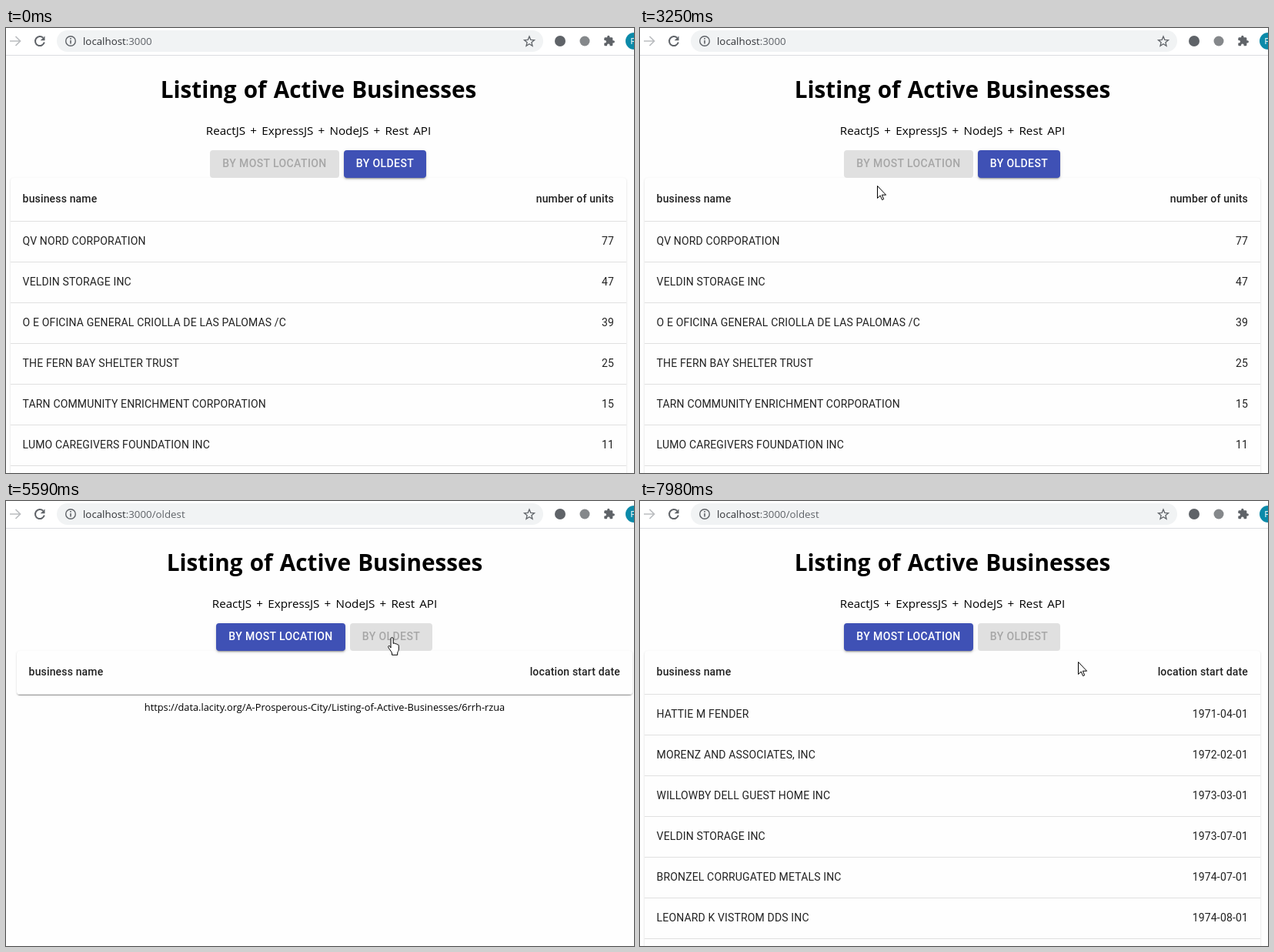
Recreate the animation shown at these times as an HTML page. Size 816x579 px, loop 8 s.

```html
<!DOCTYPE html>
<html lang="en">
<head>
<meta charset="utf-8">
<title>Listing of Active Businesses</title>
<style>
  html, body { margin: 0; width: 100%; height: 100%; overflow: hidden; background: #fefefe; }
  #stage { position: relative; width: 816px; height: 579px; overflow: hidden; color: #000;
    font-family: "Open Sans", "Noto Sans", sans-serif; white-space: nowrap; }
  #stage div, svg { position: absolute; }
  #bar { left: 0; top: 0; width: 816px; height: 35px; background: #fff; border-bottom: 1px solid #dadce0; }
  #url { left: 100px; top: 7px; font-size: 13.3px; line-height: 20px; color: #303236; }
  #url span { color: #5f6368; }
  #page { left: 0; top: 0; width: 816px; height: 579px; }
  .mid { left: 6px; width: 800px; text-align: center; }
  #title { top: 58px; font-size: 29.7px; font-weight: 700; line-height: 44px; word-spacing: 1.5px; }
  #stack { top: 121px; font-size: 15.2px; line-height: 24px; word-spacing: 2.3px; }
  #link { top: 258px; font-size: 12.8px; line-height: 20px; }
  .btn { top: 159px; height: 36px; border-radius: 4px; text-align: center;
    font: 500 14px/35px Roboto, sans-serif; letter-spacing: .02857em; }
  #most { left: 265px; width: 168px; }
  #old { left: 439px; width: 107px; }
  #clip { inset: 0; overflow: hidden; border-radius: 4px; }
  #ripple { left: -7px; top: -46px; width: 138px; height: 138px; border-radius: 50%; background: #fff; }
  #paper { left: 6px; top: 195px; width: 800px; border-radius: 4px; background: #fefefe;
    box-shadow: 0 2px 1px -1px #0003, 0 1px 1px #00000024, 0 1px 3px #0000001f; }
  .row { left: 0; width: 768.4px; height: 37px; padding: 15px 16px 0 15.6px; border-bottom: 1px solid #e0e0e0;
    display: flex; justify-content: space-between; color: rgba(0,0,0,.87);
    font: 400 14px/20px Roboto, sans-serif; letter-spacing: .01071em; }
  .head { top: 0; height: 41px; font-weight: 500; line-height: 24px; }
  #cursor { left: 0; top: 0; }
</style>
</head>
<body>
<div id="stage">
  <div id="page">
    <div id="title" class="mid">Listing of Active Businesses</div>
    <div id="stack" class="mid">ReactJS + ExpressJS + NodeJS + Rest API</div>
    <div id="paper">
      <div class="row head"><span>business name</span><span id="column"></span></div>
      <div id="units"></div>
      <div id="dates"></div>
    </div>
    <div id="link" class="mid">https://data.lacity.org/A-Prosperous-City/Listing-of-Active-Businesses/6rrh-rzua</div>
    <div id="most" class="btn">BY MOST LOCATION</div>
    <div id="old" class="btn">BY OLDEST<div id="clip"><div id="ripple"></div></div></div>
  </div>

  <div id="bar">
    <svg width="816" height="35" fill="none" stroke="#5f6368" stroke-width="1.7">
      <rect x="66" y="3" width="632" height="28" rx="14" fill="#f1f3f4" stroke="none"/>
      <path d="M5 17H18M12.5 11l6 6-6 6" stroke="#bbbdc0"/>
      <path d="M48.2 12.8A6 6 0 1 0 49.8 18.6" stroke-width="2"/>
      <path d="M50.5 10.5V16.3H44.7z" fill="#5f6368" stroke="none"/>
      <circle cx="84" cy="17" r="6.3" stroke-width="1.4"/>
      <path d="M84 16V20.5M84 13V14.7" stroke-width="1.6"/>
      <path d="M680 11l1.8 4.3 4.7.4-3.6 3 1.1 4.6-4-2.5-4 2.5 1.1-4.6-3.6-3 4.7-.4z" stroke-width="1.3"/>
      <g stroke="none" fill="#5f6368">
        <circle cx="720" cy="17" r="7"/>
        <circle cx="752" cy="17" r="6.5" fill="#85888b"/>
        <path transform="translate(776 9) scale(.65)" d="M20.5 11H19V7c0-1.1-.9-2-2-2h-4V3.5a2.5 2.5 0 0 0-5 0V5H4c-1.1 0-2 .9-2 2v3.8h1.5a2.7 2.7 0 0 1 0 5.4H2V20c0 1.1.9 2 2 2h3.8v-1.5a2.7 2.7 0 0 1 5.4 0V22H17c1.1 0 2-.9 2-2v-4h1.5a2.5 2.5 0 0 0 0-5z"/>
        <circle cx="816" cy="17" r="11" fill="#0b8aa9"/>
        <text x="811.5" y="21" font-family="Roboto, sans-serif" font-size="11" fill="#fff">P</text>
      </g>
    </svg>
    <div id="url">localhost<span>:3000<span id="path"></span></span></div>
  </div>

  <svg id="cursor" width="816" height="579" fill="#fff" stroke="#000" stroke-linejoin="round">
    <path id="arrow" d="M.5 .5V16.5L4.2 13 6.6 18.6 8.7 17.7 6.4 12.2H11.6z"/>
    <path id="hand" d="M4 14V2.2a1.6 1.6 0 0 1 3.2 0V8.5c1-.9 2.4-.6 2.6.5 1-.6 2.2-.2 2.4.8 1.2-.3 2.1.3 2.1 1.5V16c0 2-1.6 3-1.6 5v2.3H5.5V21C5 18.5.6 14.5.6 12.5c0-1.2 1.6-1.4 2.4-.3z"/>
  </svg>
</div>

<script>
const $ = id => document.getElementById(id);

const LOOP = 8000, HOVER = 4450, PRESS = 4990, ROUTE = 5200, SWITCH = 5350, LOADED = 7830;

const units = [
  ["QV NORD CORPORATION", 77],
  ["VELDIN STORAGE INC", 47],
  ["O E OFICINA GENERAL CRIOLLA DE LAS PALOMAS /C", 39],
  ["THE FERN BAY SHELTER TRUST", 25],
  ["TARN COMMUNITY ENRICHMENT CORPORATION", 15],
  ["LUMO CAREGIVERS FOUNDATION INC", 11]
];
const dates = [
  ["HATTIE M FENDER", "1971-04-01"],
  ["MORENZ AND ASSOCIATES, INC", "1972-02-01"],
  ["WILLOWBY DELL GUEST HOME INC", "1973-03-01"],
  ["VELDIN STORAGE INC", "1973-07-01"],
  ["BRONZEL CORRUGATED METALS INC", "1974-07-01"],
  ["LEONARD K VISTROM DDS INC", "1974-08-01"]
];
const fill = (id, rows) => $(id).innerHTML = rows.map(([name, value], i) =>
  `<div class="row" style="top:${57 + 53 * i}px"><span>${name}</span><span>${value}</span></div>`).join("");
fill("units", units);
fill("dates", dates);

// Pointer path: time, x, y
const path = [
  [1080, 804, 160], [1390, 720, 170], [1616, 647, 221], [1700, 690, 262], [1850, 800, 311],
  [1930, 806, 312], [2100, 800, 230], [2250, 760, 173], [2460, 680, 200], [2700, 603, 245],
  [2900, 500, 236], [3150, 304, 212], [3226, 308, 205], [3390, 330, 199], [3545, 381, 198],
  [3640, 412, 198], [4110, 412, 198], [4330, 450, 211], [4500, 480, 196], [4730, 501, 177],
  [6900, 501, 177], [6980, 494, 190], [7200, 500, 200], [7400, 517, 207], [7595, 535, 211],
  [7670, 543, 211], [7978, 569, 209]
];

const clamp = v => Math.min(1, Math.max(0, v));
const ease = v => (v = clamp(v), v * v * (3 - 2 * v));
const lerp = (a, b, k) => a + (b - a) * k;
const mix = (a, b, k) => a.map((v, i) => lerp(v, b[i], k));

// Button looks: colour, then offset, blur and spread of three shadows
const idle = { bg: [63, 81, 181], shade: [3, 1, -2, 2, 2, 0, 1, 5, 0] };
const hover = { bg: [48, 63, 159], shade: [2, 4, -1, 4, 5, 0, 1, 10, 0] };
const pressed = { bg: hover.bg, shade: [5, 5, -3, 8, 10, 1, 3, 14, 2] };
const off = { bg: [224, 224, 224], shade: [0, 0, 0, 0, 0, 0, 0, 0, 0] };

function paint(id, from, to, k, enabled) {
  const s = mix(from.shade, to.shade, k), style = $(id).style;
  style.background = `rgb(${mix(from.bg, to.bg, k).map(Math.round)})`;
  style.boxShadow = [.2, .14, .12].map((a, i) =>
    `0 ${s[3 * i]}px ${s[3 * i + 1]}px ${s[3 * i + 2]}px rgba(0,0,0,${a})`).join();
  style.color = enabled ? "#fff" : "rgba(0,0,0,.26)";
}

function pointer(t) {
  const step = 76.65, q = 1080 + Math.floor((t - 1080) / step) * step;
  const i = path.findIndex(p => p[0] > q);
  if (i < 0) return path[path.length - 1];
  if (i === 0) return path[0];
  const a = path[i - 1], b = path[i];
  return mix(a, b, (q - a[0]) / (b[0] - a[0]));
}

const show = (id, on) => $(id).style.display = on ? "" : "none";

function draw(t) {
  const switched = t >= SWITCH, empty = switched && t < LOADED;
  const k = ease((t - SWITCH) / 230);

  $("path").textContent = t >= ROUTE ? "/oldest" : "";
  $("page").style.left = empty ? "8px" : "0";
  $("paper").style.height = empty ? "57px" : "500px";
  $("column").textContent = switched ? "location start date" : "number of units";
  show("units", !switched);
  show("dates", switched && !empty);
  show("link", empty);

  paint("most", off, idle, k, switched);
  if (switched) paint("old", pressed, off, k, false);
  else if (t >= PRESS) paint("old", hover, pressed, ease((t - PRESS) / 250), true);
  else paint("old", idle, hover, ease((t - HOVER) / 250), true);

  const grow = ease((t - PRESS) / 550);
  $("ripple").style.transform = `scale(${grow})`;
  $("ripple").style.opacity = lerp(.1, .3, grow) * (1 - k);

  const [, x, y] = pointer(t).map(Math.round);
  const pointing = t >= 4480 && t < 6910;
  show("cursor", t >= 1080);
  show("hand", pointing);
  show("arrow", !pointing);
  $("hand").setAttribute("transform", `translate(${x - 5} ${y})`);
  $("arrow").setAttribute("transform", `translate(${x} ${y})`);
}

const start = performance.now();
function tick(now) {
  draw(Math.max(0, now - start) % LOOP);
  requestAnimationFrame(tick);
}
tick(start);
</script>
</body>
</html>
```
